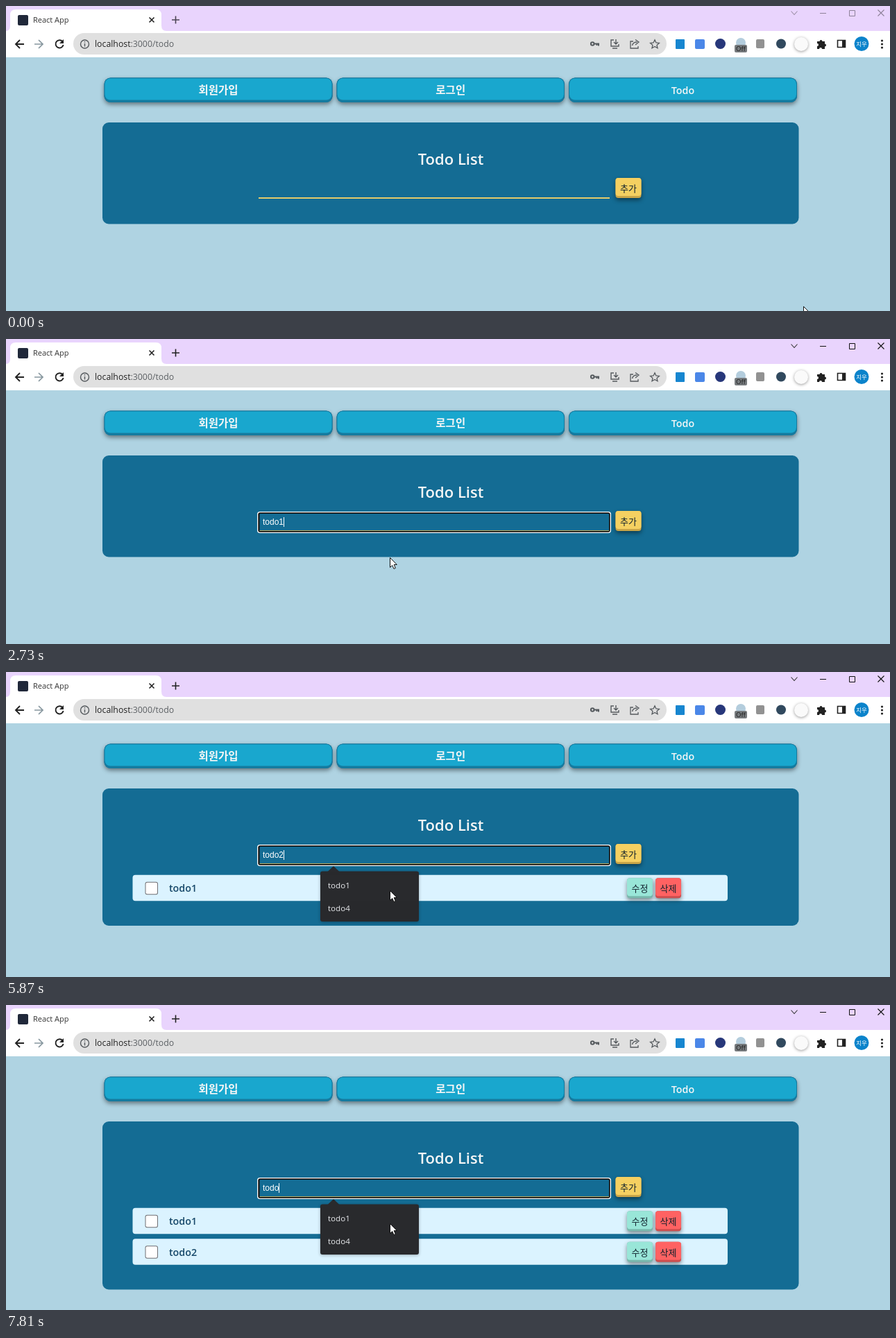
These frames come from a looping animation (1274x440 px, 8 s). An HTML page with a canvas:

```html
<!DOCTYPE html>
<html lang="ko">
<head>
<meta charset="utf-8">
<title>Todo List</title>
<style>
  html, body { margin: 0; width: 100%; height: 100%; overflow: hidden; background: #afd3e2; }
  canvas { display: block; width: 1274px; height: 440px; }
</style>
</head>
<body>
<canvas id="stage" width="1274" height="440"></canvas>
<script>
const ctx = document.getElementById('stage').getContext('2d');
const LOOP = 8000, FOCUS = 660, BLINK = 530, FADE = 200;
const NAVY = '#146c94', CYAN = '#19a7ce', SKY = '#afd3e2', YELLOW = '#f5d061';
const UI = '"Open Sans", "Noto Sans", "Noto Sans CJK KR", sans-serif';
const KR = '"Noto Sans CJK KR", "Noto Sans CJK", sans-serif';
const FIELD = '12px "Liberation Sans", Arial, sans-serif';

// [time, text in the field, number of suggestions]
const keys = [
  [FOCUS, '', 0],
  [1330, 't', 3], [1400, 'to', 2], [1730, 'tod', 2], [1860, 'todo', 2], [2530, 'todo1', 0],
  [3600, '', 0],
  [5010, 't', 3], [5140, 'to', 2], [5210, 'tod', 2], [5340, 'todo', 2], [5870, 'todo2', 0],
  [5940, '', 0],
  [6610, 't', 3], [6810, 'tk', 0], [7340, 't', 3],
  [7540, 'to', 2], [7670, 'tod', 2], [7810, 'todo', 2]
];
const items = [[3600, 'todo1'], [5940, 'todo2']];
const hints = ['todo1', 'todo4', 'test'];

function box(x, y, w, h, r, color) {
  ctx.fillStyle = color;
  ctx.beginPath();
  ctx.roundRect(x, y, w, h, r);
  ctx.fill();
}

function disc(x, y, r, color) {
  ctx.fillStyle = color;
  ctx.beginPath();
  ctx.arc(x, y, r, 0, 7);
  ctx.fill();
}

function path(d, color, width = 1.5) {
  ctx.strokeStyle = color;
  ctx.lineWidth = width;
  ctx.stroke(new Path2D(d));
}

function shape(d, color) {
  ctx.fillStyle = color;
  ctx.fill(new Path2D(d));
}

function text(s, x, y, font, color, align = 'left') {
  ctx.font = font;
  ctx.fillStyle = color;
  ctx.textAlign = align;
  ctx.fillText(s, x, y);
}

function shadow(color, blur, dy) {
  ctx.shadowColor = color;
  ctx.shadowBlur = blur;
  ctx.shadowOffsetY = dy;
}

function noShadow() {
  shadow('transparent', 0, 0);
}

function button(x, y, w, h, r, color, edge, lip) {
  shadow('rgba(0,0,0,.45)', 6, 3);
  box(x, y, w, h, r, edge);
  noShadow();
  box(x, y, w, h - lip, r, color);
}

function smallButton(label, x, y, color, edge) {
  button(x, y, 37, 29, 4, color, edge, 3);
  text(label, x + 18.5, y + 20, '500 13px ' + KR, '#10202c', 'center');
}

function tabStrip(active) {
  const dim = active ? '#111' : '#8d8198';
  box(0, 0, 1274, 36, 0, '#e9d4fd');
  shape('M0 36Q6 36 6 28V13Q6 5 14 5H216Q224 5 224 13V28Q224 36 231 36Z', '#fff');
  box(17, 13, 15, 15, 2, '#20283a');
  text('React App', 39, 24, '11px ' + UI, '#333');
  path('M206.5 16.5l7 7m0-7l-7 7', '#222', 1.6);
  path('M239 20h11m-5.500-5.500v11', active ? '#222' : '#4b4453', 1.6);
  path('M1131.500 7.500l4.500 5 4.500-5', active ? '#333' : '#9b8fa6', 1.1);
  path('M1173 10.500h9', dim, 1);
  path('M1215.500 6.500h8v8h-8z', dim, 1);
  path('M1256.500 5.500l9 9m0-9l-9 9', dim, 1.1);
}

function toolbar() {
  const grey = '#555a5e';
  box(0, 36, 1274, 38, 0, '#fff');
  path('M26 55H14m6-6l-6 6 6 6', '#222', 1.9);
  path('M41 55h12m-6-6l6 6-6 6', '#87979f', 1.7);
  path('M81.500 51.300a5.600 5.600 0 1 0 1.100 4.700', '#222', 1.9);
  shape('M83 48v6h-6z', '#222');

  box(97, 39, 855, 31, 15.5, '#e0e0e0');
  path('M119.500 55a6 6 0 1 1-12 0a6 6 0 1 1 12 0M113.500 54v4.500M113.500 51v1.500', grey, 1.4);
  const font = '12.3px ' + UI;
  text('localhost', 128, 59, font, '#222');
  const w = ctx.measureText('localhost').width;
  text(':3000/todo', 128 + w, 59, font, '#5c6064');

  path('M847.500 54.500a2.300 2.300 0 1 1-4.600 0a2.300 2.300 0 1 1 4.600 0H854v3m-2.500-3v2.500', grey, 2);
  path('M876 49h-4v9h11v-3M874 61h7M879 48v7m-3-3l3 3 3-3', grey, 1.4);
  path('M904 51h-4v10h11v-3M902.500 57q1-5 7-5m-2.500-3.500l5 3.500-5 4', grey, 1.3);
  path('M935 48.800l1.900 4.100 4.500.5-3.400 3 1 4.400-4-2.300-4 2.300 1-4.400-3.400-3 4.500-.5z', grey, 1.3);

  box(965, 48, 13, 14, 1, '#1786d0');
  box(993, 48, 14, 14, 2, '#4b87e8');
  disc(1029.5, 54.5, 7.5, '#27377a');
  disc(1059, 53, 7, '#b4cddd');
  box(1050, 56, 18, 11, 2, '#777b7e');
  text('Off', 1059, 65, '9.500px ' + UI, '#161616', 'center');
  box(1081, 48, 12, 13, 2, '#929292');
  disc(1117, 54.5, 7, '#31495e');
  shadow('rgba(0,0,0,.4)', 4, 1);
  disc(1146, 55, 10, '#fafafa');
  noShadow();

  shape('M1169 51h3.500a2 2 0 1 1 4 0h3.500v3.500a2 2 0 1 1 0 4V62h-4a2 2 0 0 0-4 0h-3v-4a2 2 0 0 0 0-4z', '#222');
  path('M1198.500 49.500h11v10h-11z', '#222', 1.6);
  box(1205, 49, 5, 11, 0, '#222');
  disc(1233, 54.5, 10.5, '#0b83cb');
  text('지우', 1233, 58, '8.500px ' + KR, '#fff', 'center');
  for (let i = -1; i < 2; i++) disc(1262.5, 55 + i * 5, 1.6, '#222');
}

function navButton(label, x, w, font) {
  button(x, 103.5, w, 35.5, 9, '#147ba0', '#146c94', 0);
  box(x + 1, 104.5, w - 2, 31, 8, CYAN);
  text(label, x + w / 2, 127, font, '#f6f6f6', 'center');
}

function field(value, on, caret) {
  if (on) {
    box(362, 249, 510, 31, 4, '#fff');
    box(363.3, 250.3, 507.4, 28.4, 3, '#101010');
    box(365.5, 252, 503.5, 25, 1, NAVY);
    box(365.5, 276, 503.5, 1, 0, '#b9ac62');
  } else {
    box(364, 276, 506, 2, 0, '#e5cb6a');
  }
  text(value, 370, 268, FIELD, '#fff');
  if (caret) {
    const x = Math.floor(370 + ctx.measureText(value).width);
    box(x, 257, 1, 14, 0, '#fff');
  }
}

function row(label, y) {
  box(182.5, y, 857.5, 37.5, 4, '#dbf3ff');
  box(200.5, y + 10, 18.5, 18.5, 3, '#6e6e72');
  box(201.5, y + 11, 16.5, 16.5, 2, '#fff');
  text(label, 235, y + 24.5, '600 14.3px ' + UI, '#17486a');
  smallButton('수정', 895, y + 4.5, '#99e6d8', '#79b8ad');
  smallButton('삭제', 936, y + 4.5, '#ff6262', '#cc4e4e');
}

function popup(count, alpha) {
  ctx.globalAlpha = alpha;
  shadow('rgba(0,0,0,.3)', 4, 1);
  box(453, 287.5, 142, 8 + count * 32.3, 3, '#292a2d');
  noShadow();
  shape('M463.500 288l8.500-8 8.500 8z', '#292a2d');
  for (let i = 0; i < count; i++)
    text(hints[i], 464, 312 + i * 32.5, '11.6px ' + UI, '#e8eaed');
  ctx.globalAlpha = 1;
}

function cursorAt(t) {
  const q = Math.floor(t * 0.015 + 0.01) / 0.015;
  const ease = (a, b) => {
    const p = Math.min(1, Math.max(0, (q - a) / (b - a)));
    return p * p * (3 - 2 * p);
  };
  const a = ease(20, 600), b = ease(660, 860);
  return [1149 - 571 * a - 25 * b, 433 - 168 * a + 50 * b];
}

function cursor(x, y) {
  ctx.save();
  ctx.translate(x, y);
  const d = 'M.5.500V14.500L3.700 11.500 6 16.500 8.300 15.500 6.200 10.500H10.300Z';
  shape(d, '#fff');
  path(d, '#111', 1);
  ctx.restore();
}

function draw(t) {
  const n = keys.findLastIndex(k => t >= k[0]);
  const [since, value, count] = n < 0 ? [0, '', 0] : keys[n];
  const on = n >= 0;
  const caret = on && Math.floor((t - since) / BLINK) % 2 === 0;
  const list = items.filter(i => t >= i[0]);

  box(0, 0, 1274, 440, 0, SKY);
  tabStrip(on);
  toolbar();
  navButton('회원가입', 141.5, 329, 'bold 15.5px ' + KR);
  navButton('로그인', 476.5, 328.5, 'bold 15.5px ' + KR);
  navButton('Todo', 811, 329, '600 14.3px ' + UI);

  const height = list.length ? 153.5 + list.length * 44.5 : 146.5;
  box(139, 168, 1003.5, height, 9, NAVY);
  text('Todo List', 641, 229, '600 22px ' + UI, '#f6f6f6', 'center');
  field(value, on, caret);
  smallButton('추가', 878.5, 248, YELLOW, '#c9a548');
  list.forEach((item, i) => row(item[1], 292.7 + i * 44.5));

  if (count) popup(count, 1);
  else if (n > 0) {
    // The closing list keeps fading across the next key.
    const last = keys.slice(0, n).findLastIndex(k => k[2]);
    const left = last < 0 ? 0 : 1 - (t - keys[last + 1][0]) / FADE;
    if (left > 0) popup(keys[last][2], left);
  }
  cursor(...cursorAt(t));
}

const start = performance.now();
function tick(now) {
  draw(Math.max(0, now - start) % LOOP);
  requestAnimationFrame(tick);
}
draw(0);
requestAnimationFrame(tick);
</script>
</body>
</html>
```
